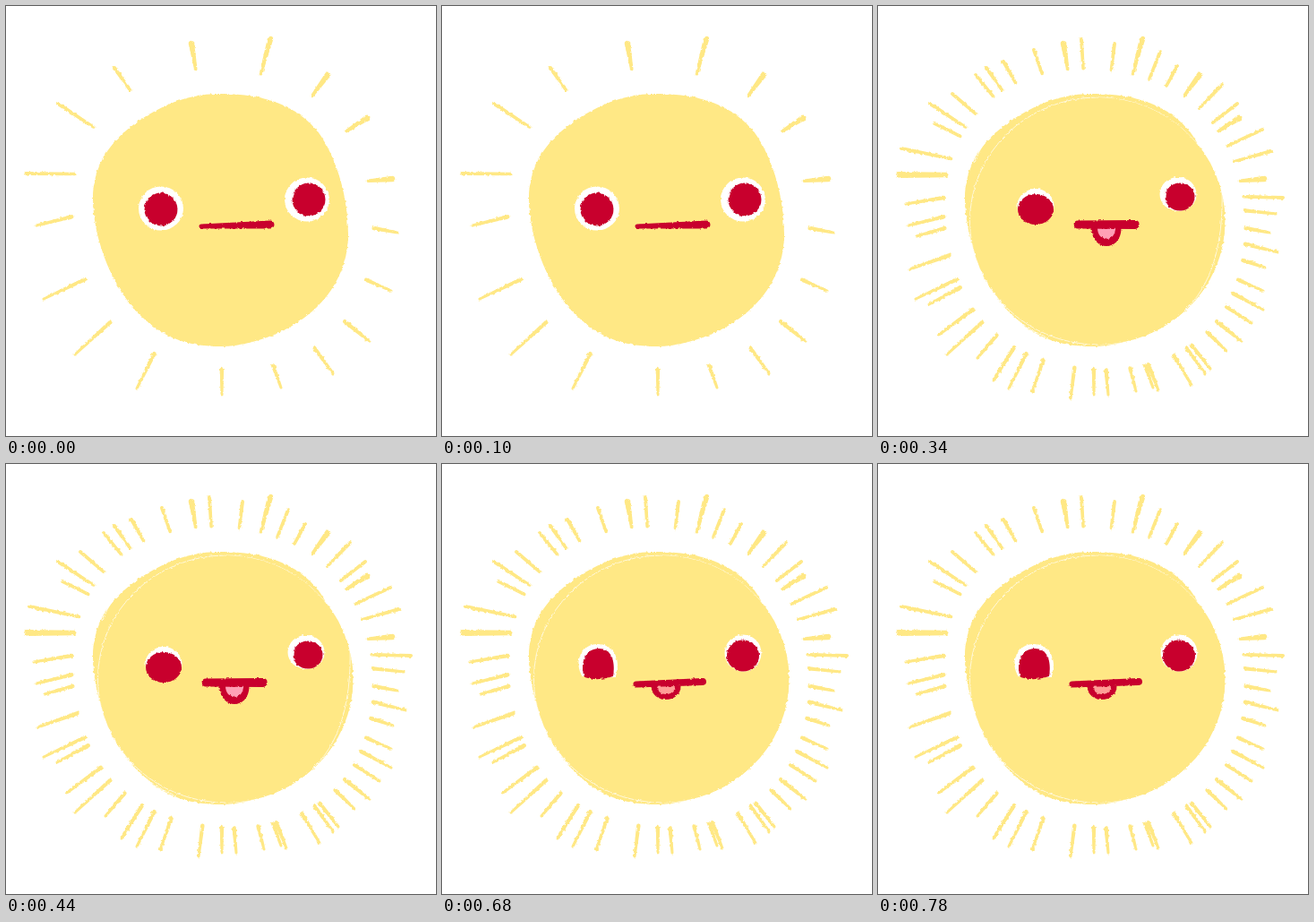
Write an HTML page that moves like this. It is 480 px wide and 480 px high and loops after 850 ms.

```html
<!DOCTYPE html>
<html lang="en">
<head>
<meta charset="utf-8">
<title>Sun</title>
<style>
  html, body { margin: 0; width: 100%; height: 100%; overflow: hidden; background: #fff; }
  svg { display: block; width: 100vw; height: 100vh; }
</style>
</head>
<body>
<svg viewBox="0 0 480 480">
  <filter id="rough" x="-5%" y="-5%" width="110%" height="110%" color-interpolation-filters="sRGB">
    <feTurbulence type="fractalNoise" baseFrequency=".3" numOctaves="2" seed="4"/>
    <feDisplacementMap in="SourceGraphic" scale="3" xChannelSelector="R" yChannelSelector="G"/>
  </filter>
  <g id="stage" filter="url(#rough)"></g>
</svg>
<script>
const YELLOW = '#ffe885', RED = '#c8002d', STEP = 170;
const { sin, cos, atan2, hypot, exp, PI } = Math;

// Outer tips of the rays, clockwise from the top
const firstTips = [[207,42], [295,37], [359,77], [403,125], [431,193], [437,253], [430,318], [405,374], [365,410],
  [307,426], [241,434], [146,427], [77,389], [42,327], [34,245], [22,187], [58,109], [121,69]];
const secondTips = [[227,37], [315,51], [384,88], [429,138], [452,214], [447,275], [430,339], [389,385], [350,423],
  [288,430], [215,438], [129,418], [68,367], [35,294], [31,221], [26,159], [83,98], [140,62]];
const thirdTips = [[174,49], [264,42], [334,67], [401,109], [439,162], [444,232], [432,292], [417,354], [371,405],
  [313,429], [257,434], [172,431], [111,393], [57,333], [43,257], [22,190], [63,131], [109,77]];

function taper(x1, y1, x2, y2, w1, w2, fill) {
  const a = atan2(y2 - y1, x2 - x1) + PI / 2;
  const at = (x, y, r) => `${x + r * cos(a)} ${y + r * sin(a)}`;
  const r = w1 / 2, s = w2 / 2;
  return `<path fill="${fill}" d="M${at(x1, y1, r)}A${r} ${r} 0 0 1 ${at(x1, y1, -r)}` +
    `L${at(x2, y2, -s)}A${s} ${s} 0 0 1 ${at(x2, y2, s)}Z"/>`;
}

// Rays run inward to an uneven ring; those at the sides tilt upward
function ray([x, y], bold) {
  const turn = atan2(y - 240, x - 240);
  const ring = 171 - 3 * cos(4 * turn) + 4 * sin(2 * turn) + 3 * cos(turn + PI / 4);
  const length = hypot(x - 240, y - 240) - ring;
  const lift = (x < 240 ? 55 : 32) * exp(-(((y - 210) / 80) ** 2));
  const aim = atan2(240 - lift - y, 240 - x);
  const widths = bold && x > 200 && y < 200 ? [6.5, 3.5] : y > 220 ? [3, 4.5] : [4, 3.5];
  return taper(x, y, x + length * cos(aim), y + length * sin(aim), ...widths, YELLOW);
}
const wave = (tips, bold) => tips.map(tip => ray(tip, bold)).join('');
const fewRays = wave(firstTips, true);
const moreRays = fewRays + wave(secondTips);
const allRays = moreRays + wave(thirdTips);

const oval = (x, y, rx, ry, fill, extra = '') =>
  `<ellipse cx="${x}" cy="${y}" rx="${rx}" ry="${ry}" fill="${fill}" ${extra}/>`;
const shape = (d, fill, extra = '') => `<path d="${d}" fill="${fill}" ${extra}/>`;

const blob = extra => shape(`M240 98C290 98 325 112 348 140C370 170 382 215 382 255
  C382 300 355 340 310 362C285 374 260 380 240 380C205 380 180 372 155 350
  C120 320 97 260 97 215C97 180 115 150 150 127C180 108 205 98 240 98Z`, YELLOW, extra);
const disc = extra => oval(245, 240, 142.5, 138, YELLOW, extra);
const chalk = 'stroke="#fff" stroke-opacity=".7"';

const plainBody = blob();
const sketchedBody = blob() + disc(chalk) + disc('clip-path="inset(0 0 0 50%)"');
const doubledBody = sketchedBody +
  shape('M108 175C120 140 145 118 185 107M384 205C386 270 370 315 342 340M112 295Q140 350 190 371', 'none', chalk);
const edgedBody = disc() + blob('stroke="#fff" stroke-width=".8"');

const eye = (white, pupil) => oval(...white, '#fff') + oval(...pupil, RED);
function tongue(x, depth, pink) {
  const half = (rx, ry, fill) => shape(`M${x - rx} 248c0 ${ry * 1.33} ${2 * rx} ${ry * 1.33} ${2 * rx} 0Z`, fill);
  return half(16.5, depth, RED) + half(10, depth * .6, pink);
}

const calmFace =
  eye([173, 226, 25, 24.5], [173, 227, 18.5, 18.5]) +
  eye([336, 216, 25, 24.5], [338, 216, 18.5, 18.5]) +
  taper(218, 246, 295, 244, 5, 9, RED);

const smirk =
  eye([336, 211, 20.5, 20.5], [336, 214, 18, 17.5]) +
  taper(217, 246, 291, 243, 7, 8, RED);
const peekFace =
  shape('M174 202C188 202 196 213 196 225L195 241Q175 246 158 243C146 222 156 202 174 202Z', '#fff') +
  oval(174, 225, 18, 18, RED) +
  tongue(255, 11, '#ff9e96') + smirk;
const lickFace =
  shape('M174 201C188 201 196 212 196 225L194 238H157C146 220 156 201 174 201Z', '#fff') +
  shape('M175 206C188 206 194 218 191 237Q175 243 159 238C153 221 161 206 175 206Z', RED) +
  tongue(250, 15, '#ff9e96') + smirk;
const grinFace =
  eye([176, 223, 20.5, 19], [176, 227, 20, 17]) +
  eye([335, 210, 20.5, 19], [337, 213, 16.5, 15.5]) +
  tongue(255, 20, '#ff9fb5') +
  taper(223, 244, 287, 244, 9, 10, RED);

const poses = [
  fewRays + plainBody + calmFace,
  moreRays + sketchedBody + peekFace,
  allRays + doubledBody + grinFace,
  allRays + edgedBody + calmFace,
  allRays + sketchedBody + lickFace
];

const stage = document.getElementById('stage');
let shown = -1;
function tick() {
  const pose = Math.floor(performance.now() / STEP) % poses.length;
  if (pose !== shown) stage.innerHTML = poses[shown = pose];
  requestAnimationFrame(tick);
}
tick();
</script>
</body>
</html>
```
